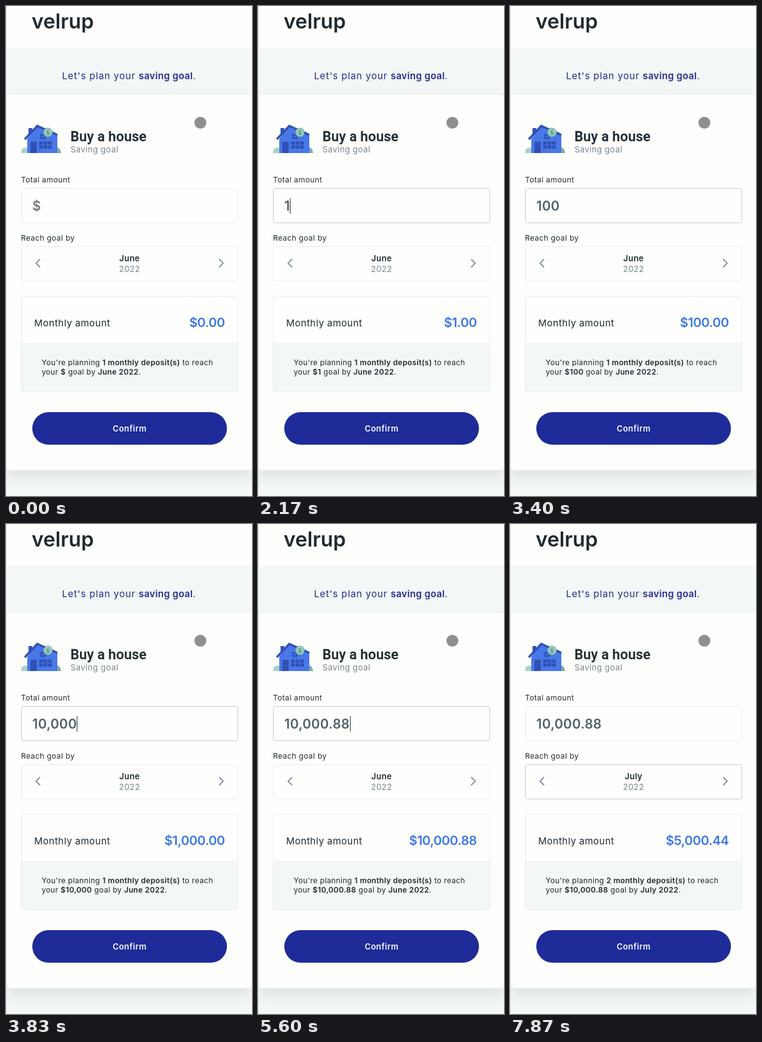
Recreate the animation shown at these times as an HTML page. Size 393 by 783 pixels, loop 8 s.

```html
<!DOCTYPE html>
<html lang="en">
<head>
<meta charset="utf-8">
<title>Saving goal</title>
<style>
  html, body { margin: 0; width: 100%; height: 100%; overflow: hidden; background: #f3f7f6; }
  svg { display: block; font-family: Inter, sans-serif; fill: #1e2a2f; }
  .b { font-weight: 600; }
  .small { font-size: 12px; letter-spacing: .43px; }
  .note { font-size: 12px; letter-spacing: .33px; }
  .medium { font-size: 13px; letter-spacing: .45px; }
  .muted { fill: #76868e; }
  .field { fill: #fefefd; stroke: #eaeded; }
  .field.focus { stroke: #c9cccd; }
  .arrow { fill: none; stroke: #8395a0; stroke-width: 1.8; }
  .card { fill: #fefefd; filter: drop-shadow(0 12px 11px rgba(20, 45, 45, .09)); }
  #value { font-size: 21px; letter-spacing: .25px; fill: #4f626b; }
  #value.empty { fill: #757575; }
  #amount { font-size: 20.5px; letter-spacing: -.5px; fill: #3c78e6; }
</style>
</head>
<body>
<svg width="393" height="783" viewBox="0 0 393 783">
  <rect width="393" height="783" fill="#f3f7f6"/>
  <rect width="393" height="67" fill="#fefefd"/>
  <text class="b" x="41" y="36" font-size="32.5">velrup</text>
  <text x="89.5" y="117" font-size="15" fill="#232c8d" letter-spacing=".85">Let's plan your <tspan class="b" letter-spacing=".33">saving goal</tspan>.</text>

  <rect class="card" x="1" y="142.5" width="392" height="599" rx="6"/>
  <rect width="1" height="783" fill="#dfe3e3"/>
  <circle cx="310.5" cy="186.5" r="9.5" fill="#8f8f8f"/>

  <g id="house">
    <path d="M24 235q0-8 7-9q6 1 6 9z" fill="#a9d1c5"/>
    <path d="M77 235v-9q10-2 11 9z" fill="#7eaea7"/>
    <path d="M36 195h6v12h-6z" fill="#3554b9"/>
    <path d="M34 235V212L50 192L78 202L82 207V235z" fill="#4878e8"/>
    <path d="M30 213L50 191.500L82 206" fill="none" stroke="#3050b4" stroke-width="3.500"/>
    <path d="M39 217h10v18h-10zM53 216.500h20v11.500h-20z" fill="#3050b4"/>
    <circle cx="59" cy="208.500" r="5" fill="#3050b4"/>
    <path d="M53 222h20M59.500 216v12M66.500 216v12M54 208.500h10M59 203v11" stroke="#4878e8" stroke-width="1.200"/>
    <circle cx="67" cy="202" r="7" fill="#9acbbd" stroke="#72aaa0"/>
    <text class="b" x="67" y="205.500" font-size="9" text-anchor="middle" fill="#528f86">$</text>
  </g>
  <text x="103" y="216" font-size="22" font-weight="500" letter-spacing=".15" font-family="Roboto, sans-serif" stroke="#1e2a2f" stroke-width=".3">Buy a house</text>
  <text class="muted medium" x="103" y="234">Saving goal</text>

  <text class="small" x="24" y="282">Total amount</text>
  <rect class="field" id="amountField" x="24.500" y="291.500" width="346" height="55" rx="3"/>
  <text class="b" id="value" x="42" y="327"></text>
  <rect id="caret" y="307" width="1" height="25" fill="#2c3a42"/>

  <text class="small" x="24" y="375">Reach goal by</text>
  <rect class="field" id="dateField" x="24.500" y="384.500" width="346" height="55" rx="3"/>
  <path class="arrow" d="M54.500 404.500L48 411L54.500 417.500M340.500 404.500L347 411L340.500 417.500"/>
  <text class="b medium" id="month" x="197.500" y="408" text-anchor="middle"></text>
  <text class="muted medium" x="197.500" y="425" text-anchor="middle">2022</text>

  <rect class="field" x="24.500" y="464.500" width="346" height="152" rx="3"/>
  <rect x="25" y="538" width="345" height="78" rx="2" fill="#f3f7f6"/>
  <text x="45" y="512" font-size="15" letter-spacing=".5">Monthly amount</text>
  <text class="b" id="amount" x="349.500" y="513" text-anchor="end"></text>
  <text class="note" x="57" y="574">You're planning <tspan class="b"><tspan id="count"></tspan> monthly deposit(s)</tspan> to reach</text>
  <text class="note" x="57" y="589">your <tspan class="b" id="total"></tspan> goal by <tspan class="b" id="deadline"></tspan>.</text>

  <rect x="42" y="649" width="311" height="52" rx="26" fill="#1e2b99"/>
  <text class="b medium" x="197.500" y="680" text-anchor="middle" style="fill:#fefefd">Confirm</text>
</svg>
<script>
const LOOP = 8000;
const $ = id => document.getElementById(id);

// Each track alternates start time (ms) and the value held from then on.
const tracks = {
  typed: [0, '', 2170, '1', 2370, '10', 2870, '100', 3430, '1,000', 3830, '10,000',
          5100, '10,000.', 5430, '10,000.8', 5600, '10,000.88'],
  amount: [0, '0.00', 2170, '1.00', 2500, '10.00', 2930, '100.00', 3430, '1,000.00',
           4000, '10,000.00', 5500, '10,000.80', 5600, '10,000.88', 7870, '5,000.44'],
  caret: [0, 0, 1270, 1, 1770, 0, 2170, 1, 3400, 0, 3430, 1, 4500, 0, 4830, 1, 6100, 0, 6600, 1, 6730, 0],
  focus: [0, '', 1270, 'amountField', 6730, 'dateField'],
  months: [0, 1, 7870, 2],
};

function valueAt(track, t) {
  let i = track.length - 2;
  while (track[i] > t) i -= 2;
  return track[i + 1];
}

function setText(id, text) {
  if ($(id).textContent !== text) $(id).textContent = text;
}

function draw() {
  const t = performance.now() % LOOP;
  const now = name => valueAt(tracks[name], t);
  const typed = now('typed'), months = now('months');
  const month = ['June', 'July'][months - 1];

  setText('value', typed || '$');
  $('value').classList.toggle('empty', !typed);
  setText('amount', '$' + now('amount'));
  setText('total', '$' + typed);
  setText('month', month);
  setText('deadline', month + ' 2022');
  setText('count', String(months));

  for (const id of ['amountField', 'dateField']) $(id).classList.toggle('focus', now('focus') === id);
  const width = typed ? $('value').getComputedTextLength() : 0;
  $('caret').setAttribute('x', Math.round(42 + width));
  $('caret').setAttribute('opacity', now('caret'));
  requestAnimationFrame(draw);
}
draw();
</script>
</body>
</html>
```
